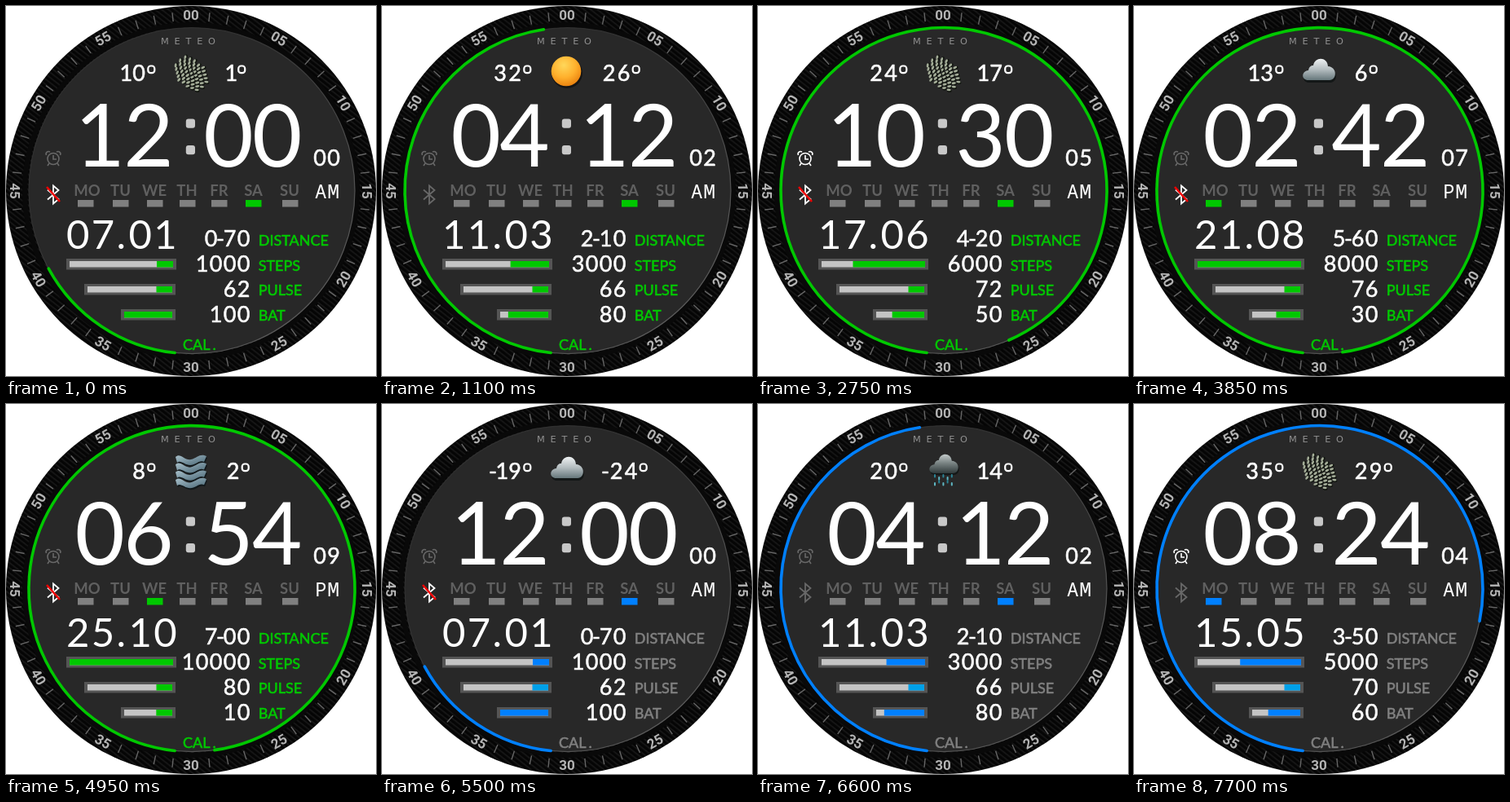
These frames come from a looping animation (454x454 px, 8 s). An HTML page:

```html
<!DOCTYPE html>
<html lang="en">
<head>
<meta charset="utf-8">
<title>Watch face</title>
<style>
html, body { margin: 0; width: 100%; height: 100%; overflow: hidden; background: #fff; }
svg { display: block; width: 100vw; height: 100vh; }
text { font-family: Lato, sans-serif; fill: #fff; }
.num { font-size: 27px; stroke: #fff; stroke-width: .6px; text-anchor: middle; }
.label { font-size: 18px; stroke-width: .6px; }
.big { font-size: 106px; letter-spacing: -1.9px; }
.date { font-size: 49px; letter-spacing: 2.4px; }
.day { font-size: 18.5px; font-weight: 700; fill: #606060; text-anchor: middle; }
.half { font: 500 24px "Noto Sans Mono", monospace; letter-spacing: 1.2px; }
.title { font: 11.3px "DejaVu Sans", sans-serif; letter-spacing: 6.8px; fill: #909090; }
.mark { font: 700 17px Roboto, sans-serif; fill: #b4b4b4; text-anchor: middle; }
</style>
</head>
<body>
<svg id="stage" viewBox="0 0 454 454">
  <defs>
    <pattern id="weave" width="5" height="5" patternUnits="userSpaceOnUse" patternTransform="rotate(38)">
      <rect width="5" height="5" fill="#050505"/>
      <rect width="5" height="1.6" fill="#181818"/>
    </pattern>
    <linearGradient id="rim" x1="0" y1="0" x2="1" y2="1">
      <stop offset=".3" stop-color="#303030"/>
      <stop offset="1" stop-color="#666"/>
    </linearGradient>
    <radialGradient id="sunFill" cx=".42" cy=".3" r=".75">
      <stop offset="0" stop-color="#ffd75a"/>
      <stop offset=".55" stop-color="#ffb02c"/>
      <stop offset="1" stop-color="#e87d0c"/>
    </radialGradient>
    <linearGradient id="cloudFill" x1="0" y1="0" x2="0" y2="1">
      <stop offset="0" stop-color="#eef1f2"/>
      <stop offset=".5" stop-color="#b4bdc0"/>
      <stop offset="1" stop-color="#66777b"/>
    </linearGradient>
    <linearGradient id="rainFill" x1="0" y1="0" x2="0" y2="1">
      <stop offset="0" stop-color="#c3caca"/>
      <stop offset=".45" stop-color="#7b8585"/>
      <stop offset="1" stop-color="#303a3b"/>
    </linearGradient>
    <linearGradient id="waveFill" x1="0" y1="0" x2="1" y2="1">
      <stop offset="0" stop-color="#a9c1cb"/>
      <stop offset=".5" stop-color="#7893a0"/>
      <stop offset="1" stop-color="#4a6775"/>
    </linearGradient>
    <path id="cloud" d="M214 91C205 91 205 80 214 79C215 73 219 73 220 73C222 62 237 62 238 74C250 75 249 91 240 91Z"/>
  </defs>
</svg>
<script>
const STEP = 550, LOOP = 8000;
const DAYS = ["MO", "TU", "WE", "TH", "FR", "SA", "SU"];
const DAY_X = [99.5, 140.5, 182, 222, 261.5, 303.5, 348];
const THEMES = [
  { main: "#00c800", pulse: "#00c800", label: "#00c800" },
  { main: "#0080ff", pulse: "#00a0e8", label: "#808080" }
];
const WEATHER = [
  ["fog", 10, 1], ["rain", 18, 9], ["sun", 32, 26], ["cloud", 15, 8], ["wind", 20, 11],
  ["fog", 24, 17], ["sun", 28, 21], ["cloud", 13, 6], ["rain", 11, 4], ["wind", 8, 2],
  ["cloud", -19, -24], ["sun", 27, 19], ["rain", 20, 14], ["cloud", 16, 7], ["fog", 35, 29]
];
// Cell widths of the two digit sets; other characters use "any"
const VALUE = { any: 17, "-": 6 };
const TEMP = { any: 18, "1": 13.5, "-": 9 };

const svg = document.getElementById("stage");

function el(tag, attrs, parent = svg) {
  const node = document.createElementNS("http://www.w3.org/2000/svg", tag);
  for (const key in attrs) node.setAttribute(key, attrs[key]);
  parent.appendChild(node);
  return node;
}
function text(cls, x, y, str = "", extra = {}) {
  const node = el("text", { class: cls, x, y, ...extra });
  node.textContent = str;
  return node;
}
const rect = (x, y, width, height, fill) => el("rect", { x, y, width, height, fill });
const set = (node, key, value) => node.setAttribute(key, value);
const pad = n => String(n).padStart(2, "0");

// Centres each character in its cell; returns the right edge.
function write(node, value, cells, { left, right }) {
  const chars = [...String(value)];
  const widths = chars.map(c => cells[c] || cells.any);
  let x = left ?? right - widths.reduce((sum, w) => sum + w, 0);
  set(node, "x", widths.map(w => (x += w) - w / 2).join(" "));
  node.textContent = chars.join("");
  return x;
}

// Angles run clockwise from the bottom of the dial.
function polar(cx, cy, r, deg) {
  const a = deg * Math.PI / 180;
  return [cx - r * Math.sin(a), cy + r * Math.cos(a)];
}

// Bezel
el("circle", { cx: 227, cy: 227, r: 227, fill: "url(#weave)" });
el("circle", { cx: 227, cy: 227, r: 204, fill: "none", stroke: "#090909", "stroke-width": 6 });
for (let m = 0; m < 60; m++) {
  const deg = m * 6;
  if (m % 5) {
    el("path", { d: "M227 7V18", stroke: "#666", "stroke-width": 1.4, transform: `rotate(${deg} 227 227)` });
  } else {
    const [x, y] = polar(227, 227, 216, deg + 180);
    const turn = deg > 90 && deg <= 270 ? deg - 180 : deg;
    text("mark", 0, 6, pad(m), { transform: `translate(${x} ${y}) rotate(${turn})` });
  }
}

// Dial
const DIAL = [228, 226.6, 200];
el("circle", { cx: DIAL[0], cy: DIAL[1], r: 200, fill: "#282828", stroke: "url(#rim)", "stroke-width": 1.2 });
const arc = el("path", { fill: "none", "stroke-width": 3.6, "stroke-linecap": "round" });
text("title", 190, 47, "METEO");

// Weather icons
const icons = {};
for (const name of ["fog", "sun", "wind", "cloud", "rain"]) icons[name] = el("g", {});

for (let row = 0; row < 9; row++) {
  for (let col = 0; col < 7; col++) {
    const u = col - 3, v = row - 4;
    if (u * u / 11 + v * v / 19 > 1.05) continue;
    const x = 227 + u * 5.6 + Math.sin(v * .6) * 2.2;
    const y = 83 + v * 4.4 + Math.sin(u * .9) * 3;
    const transform = `rotate(${-38 + v * 8 + u * 9} ${x} ${y})`;
    el("ellipse", { cx: x + .8, cy: y + 1.2, rx: 2.9, ry: 1.7, fill: "#11150f", transform }, icons.fog);
    el("ellipse", { cx: x, cy: y, rx: 2.6, ry: 1.4, fill: "#a3ac97", transform }, icons.fog);
  }
}

el("circle", { cx: 227, cy: 82, r: 19, fill: "#151515" }, icons.sun);
el("circle", { cx: 226, cy: 80, r: 18.3, fill: "url(#sunFill)" }, icons.sun);

for (let i = 0; i < 4; i++) {
  const y = 65 + i * 9.4;
  const d = `M208 ${y}C214 ${y - 6} 219 ${y + 5} 227 ${y + 3}S238 ${y - 5} 246 ${y - 1}L243 ${y + 6}C237 ${y + 3} 233 ${y + 10} 226 ${y + 10}S214 ${y + 3} 210 ${y + 7}Z`;
  el("path", { d, fill: "#11181b", transform: "translate(1 2)" }, icons.wind);
  el("path", { d, fill: "url(#waveFill)" }, icons.wind);
}

el("use", { href: "#cloud", fill: "#131717", transform: "translate(1 3)" }, icons.cloud);
el("use", { href: "#cloud", fill: "url(#cloudFill)" }, icons.cloud);

el("use", { href: "#cloud", fill: "#131717", transform: "translate(27 6) scale(.89)" }, icons.rain);
el("use", { href: "#cloud", fill: "url(#rainFill)", transform: "translate(26 4) scale(.89)" }, icons.rain);
for (let i = 0; i < 10; i++) {
  const x = 217 + i % 5 * 5.2, y = 87 + (i > 4 ? 7 : 0) + i % 2 * 3;
  el("path", { d: `M${x} ${y}v2.5`, stroke: i % 2 ? "#5fb8c4" : "#2b8496", "stroke-width": 2, "stroke-linecap": "round" }, icons.rain);
}

// Temperatures
const degree = x => el("rect", { x, y: 73.5, width: 8, height: 8.6, rx: 3.2, fill: "none", stroke: "#fff", "stroke-width": 2.2 });
const high = text("num", 0, 92);
const low = text("num", 0, 92);
const lowDegree = degree(0);
degree(174.3);

// Clock
const hours = text("big", 84.6, 196.5);
const minutes = text("big", 242.3, 196.5);
for (const y of [138.5, 171]) el("rect", { x: 220.8, y, width: 11.2, height: 11.2, rx: 3, fill: "#c8c8c8" });
const seconds = text("num", 0, 196);
const half = text("half", 379, 235.5);

// Status icons
const alarm = el("g", { fill: "none", "stroke-width": 1.6 });
el("circle", { cx: 58, cy: 187.5, r: 7 }, alarm);
el("path", { d: "M58 183V188H62M53 193L51 196M63 193L65 196M49.5 183C48 180 51 177.5 54 179M66.5 183C68 180 65 177.5 62 179" }, alarm);
const link = el("path", { d: "M51 225.5L64.5 237L58 242.5V220.5L64.5 226L51 237.5", fill: "none", "stroke-width": 1.8 });
const slash = el("path", { d: "M50 222L66 240", stroke: "#f00000", "stroke-width": 2.6 });

// Week
const dayMarks = DAYS.map((name, i) => {
  text("day", DAY_X[i], 232.5, name);
  return rect(Math.round(DAY_X[i] - 10.5) + (i ? 1 : -1), 238, 19.5, 8.5, "#808080");
});

// Date
const day = text("date", 74, 298);
text("date", 135.5, 298, ".");
const month = text("date", 150.5, 298);

// Bars fill from the right
function bar(x, y, w) {
  rect(x, y, w, 13.5, "#555");
  rect(x + 4, y + 3, w - 8, 7.5, "#c4c4c4");
  const fill = rect(0, y + 3, 0, 7.5, "");
  return (size, color) => {
    set(fill, "x", x + w - 4 - size);
    set(fill, "width", size);
    set(fill, "fill", color);
  };
}
const stepBar = bar(74, 310, 135);
const pulseBar = bar(96, 341, 112);
const batteryBar = bar(141, 372, 67);

// Readings
const labels = [];
const readings = ["DISTANCE", "STEPS", "PULSE", "BAT"].map((name, i) => {
  labels.push(text("label", 309.7, 294 + i * 30.5, name));
  return text("num", 0, 295 + i * 31);
});
labels.push(text("label", 217, 421.5, "CAL"), text("label", 253.5, 421.5, "."));

function drawWeather([name, hi, lo]) {
  for (const key in icons) set(icons[key], "visibility", key === name ? "visible" : "hidden");
  write(high, hi, TEMP, { right: 172 });
  set(lowDegree, "x", write(low, lo, TEMP, { left: 269.5 }) + 2.2);
}

function draw(state) {
  const k = state % 10;
  const theme = THEMES[state < 10 ? 0 : 1];
  const date = new Date(2023, k, 7 + 2 * k);

  drawWeather(WEATHER[state]);
  hours.textContent = pad(2 * k % 12 || 12);
  minutes.textContent = pad(6 * k);
  write(seconds, pad(k), VALUE, { left: 376.5 });
  half.textContent = k < 6 ? "AM" : "PM";
  day.textContent = pad(date.getDate());
  month.textContent = pad(k + 1);

  const distance = (.7 * (k + 1)).toFixed(2).replace(".", "-");
  [distance, 1000 * (k + 1), 62 + 2 * k, 100 - 10 * k]
    .forEach((value, i) => write(readings[i], value, VALUE, { right: 300 }));

  const today = (date.getDay() + 6) % 7;
  dayMarks.forEach((mark, i) => set(mark, "fill", i === today ? theme.main : "#808080"));

  const linked = k > 0 && k < 5;
  set(alarm, "stroke", k > 2 && k < 7 ? "#fff" : "#686868");
  set(link, "stroke", linked ? "#686868" : "#fff");
  set(slash, "visibility", linked ? "hidden" : "visible");

  stepBar(k < 7 ? 20 + 13.7 * k : 127, theme.main);
  pulseBar(19.5, theme.pulse);
  batteryBar((Math.round((10 - k) / 2) + 1) * 59 / 6, theme.main);

  const end = Math.min(61.5 + 55 * k, 352);
  const [x0, y0] = polar(...DIAL, 6), [x1, y1] = polar(...DIAL, end);
  set(arc, "d", `M${x0} ${y0}A200 200 0 ${end > 186 ? 1 : 0} 1 ${x1} ${y1}`);
  set(arc, "stroke", theme.main);

  for (const label of labels) {
    label.style.fill = theme.label;
    label.style.stroke = theme.label;
  }
}

let shown = -1;
const start = performance.now();
function tick() {
  const t = (performance.now() - start) % LOOP;
  const state = Math.min(Math.floor(t / STEP), WEATHER.length - 1);
  if (state !== shown) draw(shown = state);
  requestAnimationFrame(tick);
}
tick();
</script>
</body>
</html>
```
